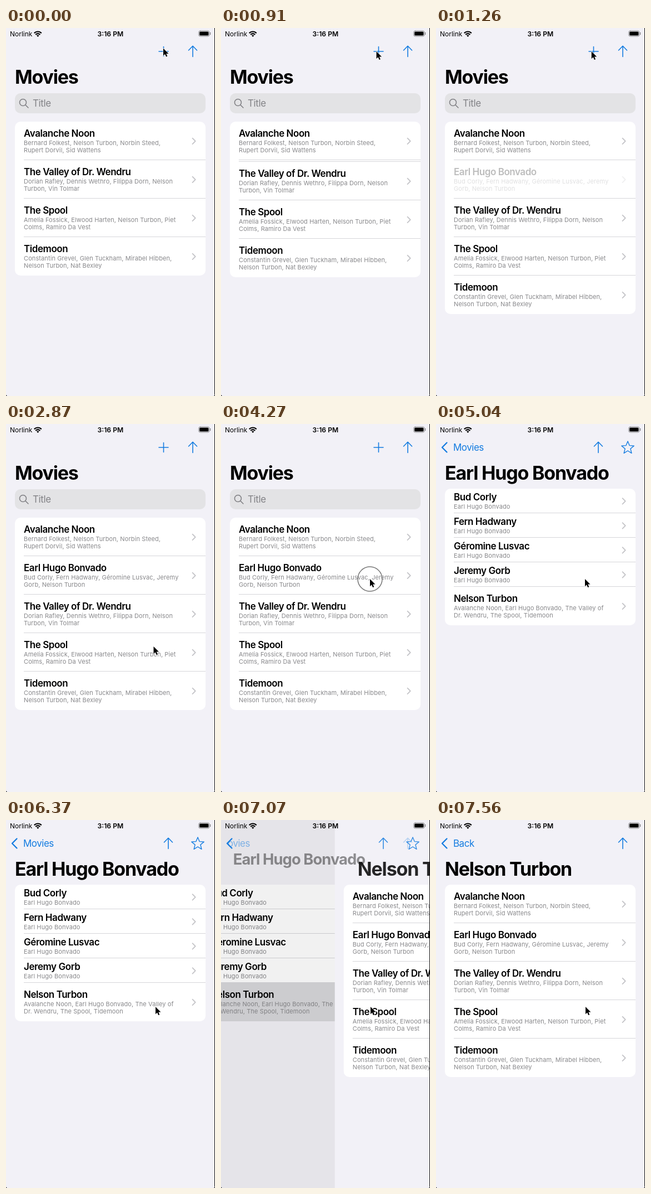
These frames come from a looping animation (376 by 660 pixels, 8 s). An HTML page:

```html
<!DOCTYPE html>
<html lang="en">
<head>
<meta charset="utf-8">
<title>Movies</title>
<style>
  html, body { margin: 0; width: 376px; height: 660px; overflow: hidden; background: #111; }
  #stage { position: relative; width: 376px; height: 660px; overflow: hidden; background: #f2f1f7;
    border-radius: 0 0 4px 4px; font-family: Inter, Roboto, sans-serif; color: #000; white-space: nowrap; }
  #stage div, #stage svg { position: absolute; }
  .page { inset: 0; background: #f2f1f7; }
  .shade { inset: 0; background: #000; opacity: 0; }
  .card { left: 16px; width: 343px; border-radius: 10px; background: #fff; overflow: hidden; }
  #stage .row { position: relative; overflow: hidden; }
  .row .line { left: 16px; right: 0; bottom: 0; height: 1px; background: #d6d6da; }
  .row:last-child .line { display: none; }
  .body { left: 0; top: 0; width: 343px; }
  .name { left: 16px; height: 20px; font: 600 17px/20px Inter, Roboto, sans-serif; letter-spacing: -.45px; }
  .cast { left: 16px; font-size: 11px; line-height: 13px; letter-spacing: .1px; color: #88888b; white-space: pre; }
  .big { left: 16px; top: 68px; font-size: 34px; font-weight: 700; line-height: 40px;
    letter-spacing: -1.2px; transform-origin: 0 50%; }
  .label { left: 31px; top: 32px; font-size: 17px; line-height: 20px; letter-spacing: -.5px;
    color: #147ce0; transform-origin: 0 50%; }
  #oldLabel { left: 13px; top: 25px; width: 120px; height: 34px; overflow: hidden; }
  #oldLabel .label { left: 18px; top: 7px; }
  #search { left: 16px; top: 117px; width: 343px; height: 36px; border-radius: 10px; background: #e3e3e5;
    color: #828286; }
  #search div { left: 32px; top: 8px; font-size: 17px; line-height: 20px; letter-spacing: -.4px; }
  .status { top: 3px; font-size: 12px; line-height: 16px; }
  #clock { left: 164.5px; font-size: 12.2px; font-weight: 600; }
  #edge { right: 0; top: 0; width: 1px; height: 660px; background: #111; }
  svg { left: 0; top: 0; overflow: visible; fill: none; stroke-linecap: round; stroke-linejoin: round; }
  #icons { stroke: #147ce0; stroke-width: 1.6; }
</style>
</head>
<body>
<div id="stage">
  <div id="pages"></div>
  <div id="search">
    <svg width="40" height="36" stroke="#808084" stroke-width="1.6"><circle cx="14.5" cy="16.5" r="6"/><path d="M19 21l5 5"/></svg>
    <div>Title</div>
  </div>
  <div class="big" id="homeTitle">Movies</div>
  <div class="big" id="filmTitle"></div>
  <div class="big" id="actorTitle"></div>
  <div id="oldLabel"><div class="label" id="moviesLabel">Movies</div></div>
  <div class="label" id="backLabel">Back</div>
  <svg id="icons" width="376" height="660">
    <path id="chevron" d="M19.5 33.5L11 42l8.5 8.5" stroke-width="2.3"/>
    <path id="plus" d="M275 42h17M283.5 33.5v17"/>
    <path id="homeArrow" d="M336 51.5v-19M328.5 40l7.5-7.7 7.5 7.7"/>
    <g id="filmIcons"><path d="M292 51.5v-19M284.5 40l7.5-7.7 7.5 7.7"/><path id="star" stroke-width="1.4"/></g>
    <path id="actorArrow" d="M336 51.5v-19M328.5 40l7.5-7.7 7.5 7.7"/>
  </svg>
  <div class="status" style="left:7px">Norlink</div>
  <div class="status" id="clock">3:16 PM</div>
  <svg width="376" height="20">
    <g stroke="#000" stroke-width="2.2" stroke-linecap="butt"><path d="M50.8 9.3a9 9 0 0 1 13 0M53.3 11.9a5.6 5.6 0 0 1 8 0"/></g>
    <path d="M57.3 16l-2.2-2.4a3.2 3.2 0 0 1 4.4 0z" fill="#000"/>
    <rect x="346.5" y="5" width="19.5" height="10" rx="3" stroke="#8d8d90"/>
    <rect x="348" y="6.5" width="16.5" height="7" rx="1.6" fill="#000"/>
    <path d="M367.5 8.3v3.4" stroke="#8d8d90" stroke-width="1.4"/>
  </svg>
  <svg id="cursor" width="20" height="20">
    <circle id="ring" r="22" stroke="#555" stroke-width="1.5"/>
    <path d="M0 0v13.2l3-2.9 2.1 4.8 2.2-.9-2-4.8h4.2z" fill="#000" stroke="#fff" stroke-width="1.2" paint-order="stroke"/>
  </svg>
  <div id="edge"></div>
</div>
<script>
const $ = id => document.getElementById(id);
const clamp = v => Math.min(1, Math.max(0, v));
const smooth = v => (v = clamp(v), v * v * (3 - 2 * v));

const film = 'Earl Hugo Bonvado', actor = 'Nelson Turbon';
const films = [
  ['Avalanche Noon', `Bernard Folkest, ${actor}, Norbin Steed,\nRupert Dorvil, Sid Wattens`],
  [film, 'Bud Corly, Fern Hadwany, Géromine Lusvac, Jeremy\nGorb, ' + actor],
  ['The Valley of Dr. Wendru', 'Dorian Rafley, Dennis Wethro, Filippa Dorn, Nelson\nTurbon, Vin Tolmar'],
  ['The Spool', `Amelia Fossick, Elwood Harten, ${actor}, Piet\nColms, Ramiro Da Vest`],
  ['Tidemoon', `Constantin Grevel, Glen Tuckham, Mirabel Hibben,\n${actor}, Nat Bexley`]
];
const actors = ['Bud Corly', 'Fern Hadwany', 'Géromine Lusvac', 'Jeremy Gorb'].map(n => [n, film]);
actors.push([actor, `Avalanche Noon, ${film}, The Valley of\nDr. Wendru, The Spool, Tidemoon`]);

function row([name, cast]) {
  const tall = cast.includes('\n'), h = tall ? 69 : 44, top = tall ? 11 : 5;
  return `<div class="row" style="height:${h}px"><div class="body" style="height:${h}px">
    <div class="name" style="top:${top}px">${name}</div>
    <div class="cast" style="top:${top + 21}px">${cast}</div>
    <svg width="343" height="${h}"><path d="M319.5 ${h / 2 - 4.8}l5.2 5.2-5.2 5.2" stroke="#c2c2c6" stroke-width="1.7"/></svg>
    </div><div class="line"></div></div>`;
}
function page(top, items) {
  const el = document.createElement('div');
  el.className = 'page';
  el.innerHTML = `<div class="card" style="top:${top}px">${items.map(row).join('')}</div><div class="shade"></div>`;
  $('pages').append(el);
  return { el, rows: el.querySelectorAll('.row'), shade: el.querySelector('.shade') };
}
$('pages').style.inset = 0;
const home = page(168, films), detail = page(116, actors), credits = page(116, films);
$('filmTitle').textContent = film;
$('actorTitle').textContent = actor;
$('star').setAttribute('d', 'M' + Array.from({ length: 10 }, (_, i) => {
  const r = i % 2 ? 5.2 : 11.8, a = i * Math.PI / 5;
  return (345 + r * Math.sin(a)).toFixed(1) + ' ' + (42.8 - r * Math.cos(a)).toFixed(1);
}).join('L') + 'Z');

const path = [[280, 283, 36.5], [770, 279.5, 42], [1750, 280, 42], [2100, 277, 130], [2590, 270, 341],
  [2870, 265.5, 399], [3080, 256, 410], [3430, 267, 310], [3640, 268, 278], [6020, 268, 278], [6370, 269, 335]];
const clicks = [[770, 910], [4270, 4410], [6720, 6790]];

function pointer(t) {
  const i = path.findIndex(p => p[0] > t);
  if (i === 0) return path[0].slice(1);
  if (i < 0) return path[path.length - 1].slice(1);
  const [a, b] = [path[i - 1], path[i]], k = (t - a[0]) / (b[0] - a[0]);
  return [a[1] + (b[1] - a[1]) * k, a[2] + (b[2] - a[2]) * k];
}
// critically damped spring, 0 to 1
function spring(t) {
  const w = Math.max(0, t) * .014, v = 1 - (1 + w) * Math.exp(-w);
  return v > .994 ? 1 : v;
}
function set(id, opacity, transform = '') {
  $(id).style.opacity = clamp(opacity);
  $(id).style.transform = transform;
}
const slide = x => `translateX(${x}px)`;
const shrink = q => `translate(${15 * q}px, ${-46 * q}px) scale(${1 - .5 * q})`;
// a label rests where its title ends up, at half the size
const settle = q => `translate(${15 * (q - 1)}px, ${46 * (1 - q)}px) scale(${2 - q})`;

function push(from, to, p, picked, on) {
  from.el.style.transform = slide(-112.8 * p);
  from.shade.style.opacity = .12 * p;
  to.el.style.transform = slide(376 * (1 - p));
  from.rows[picked].style.background = on ? '#d8d8db' : '';
}

function render(t) {
  const grow = smooth((t - 860) / 370);
  home.rows[1].style.height = 69 * grow + 'px';
  home.rows[1].firstChild.style.opacity = smooth((t - 1050) / 630);

  const p1 = spring(t - 4477), q1 = spring(t - 4491), p2 = spring(t - 6960), q2 = spring(t - 6974);
  push(home, detail, p1, 1, t >= 4480);
  push(detail, credits, p2, 4, t >= 6930);
  if (p2 === 0) detail.el.style.transform = slide(376 * (1 - p1));

  set('search', 1 - .8 * q1, slide(-376 * q1));
  const done = clamp((q1 - .75) / .2);
  set('homeTitle', (1 - done) * (1 - 1.2 * q1 * (1 - q1)), shrink(q1));
  $('homeTitle').style.color = `rgb(${20 * q1},${124 * q1},${224 * q1})`;
  set('moviesLabel', done * (1 - 1.3 * q2), slide(-87 * q2));

  set('filmTitle', q2 > 0 ? 1 - 1.5 * q2 : .3 + 1.4 * q1,
    q2 > 0 ? shrink(q2) : slide(376 * (1 - q1)));
  set('actorTitle', .3 + 1.4 * q2, slide(376 * (1 - q2)));
  set('backLabel', 2 * q2 - 1, settle(q2));

  const fadeIn = q => 2 * (q - .26), fadeOut = q => 2.4 * (.75 - q);
  set('chevron', (q1 - .6) / .3);
  set('plus', fadeOut(q1));
  set('homeArrow', fadeOut(q1));
  set('filmIcons', clamp(fadeIn(q1)) * clamp(fadeOut(q2)));
  set('actorArrow', fadeIn(q2));

  const [x, y] = pointer(t);
  set('cursor', 1, `translate(${x}px, ${y}px)`);
  set('ring', clicks.some(([a, b]) => t >= a && t < b) ? .8 : 0);
}

const start = performance.now(), step = 70;
function tick() {
  const t = (performance.now() - start) % 8000;
  render(Math.floor(t / step + .01) * step);
  requestAnimationFrame(tick);
}
tick();
</script>
</body>
</html>
```
